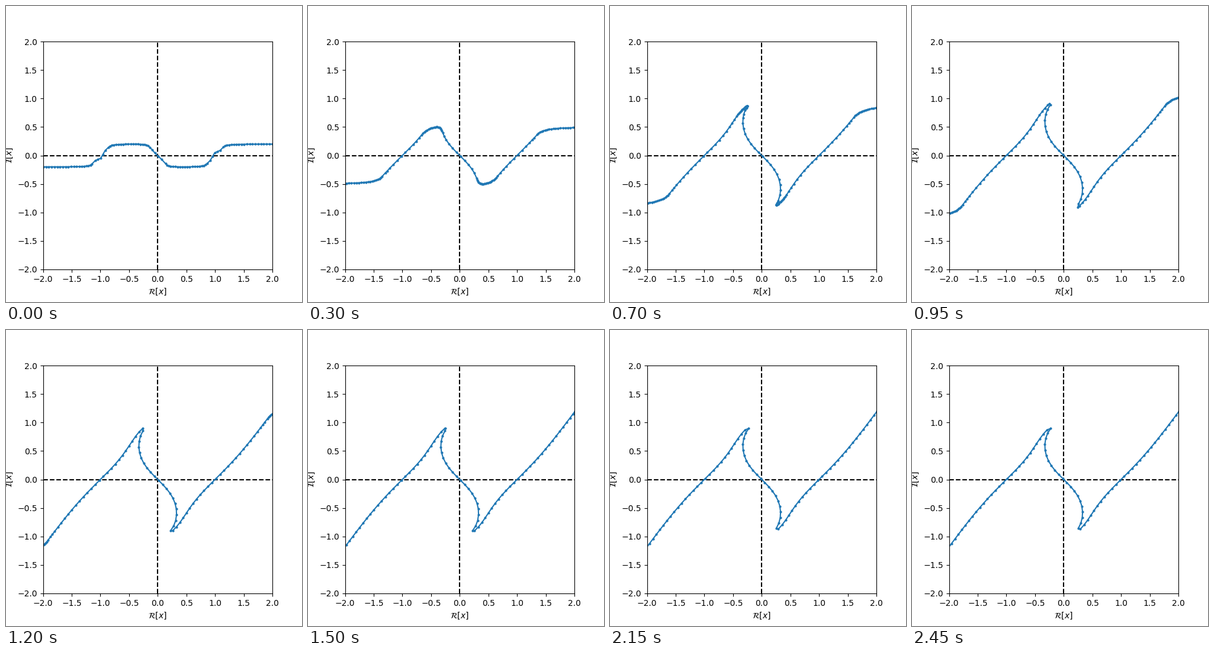
These frames come from a looping animation (500x500 px, 2.5 s). A matplotlib script:

```python
import numpy as np
import matplotlib.pyplot as plt
from matplotlib.animation import FuncAnimation

FRAMES = 50
INTERVAL = 50
WARMUP = 4          # flow steps taken before the first frame
STEP = 0.05         # distance each point moves per step
MAX_GAP = 0.1       # longer segments get a midpoint
CUTOFF = 7.4        # points beyond this Im S are dropped
BLUE = "#1f77b4"


def action(z):
    return z**2 + 4 / (1 + z**2)


def slope(z):
    return 2 * z - 8 * z / (1 + z**2) ** 2


def flow(z):
    """Move the contour one step down the gradient of Re(iS), then refine it."""
    g = np.conj(slope(z))
    z = z + STEP * 1j * g / np.abs(g)
    z = z[action(z).imag < CUTOFF]
    wide = np.flatnonzero(np.abs(np.diff(z)) > MAX_GAP)
    return np.insert(z, wide + 1, (z[wide] + z[wide + 1]) / 2)


def contours():
    # The tiny offset keeps points from landing exactly on the saddle at 0.
    z = np.linspace(-5, 5, 200) + 1e-9 * (6.2 + 1j)
    states = []
    for n in range(1, WARMUP + FRAMES):
        z = flow(z)
        if n >= WARMUP:
            states.append(z)
    return states


states = contours()

fig, ax = plt.subplots(figsize=(5, 5), dpi=100)
ax.axhline(0, color="black", ls="--")
ax.axvline(0, color="black", ls="--")
line, = ax.plot([], [], ".-", color=BLUE, ms=4)
ax.set_xlim(-2, 2)
ax.set_ylim(-2, 2)
ax.set_xlabel(r"$\mathcal{R}[x]$")
ax.set_ylabel(r"$\mathcal{I}[x]$")


def update(i):
    line.set_data(states[i].real, states[i].imag)
    return line,


anim = FuncAnimation(fig, update, frames=FRAMES, interval=INTERVAL, repeat=True)
plt.show()
```
